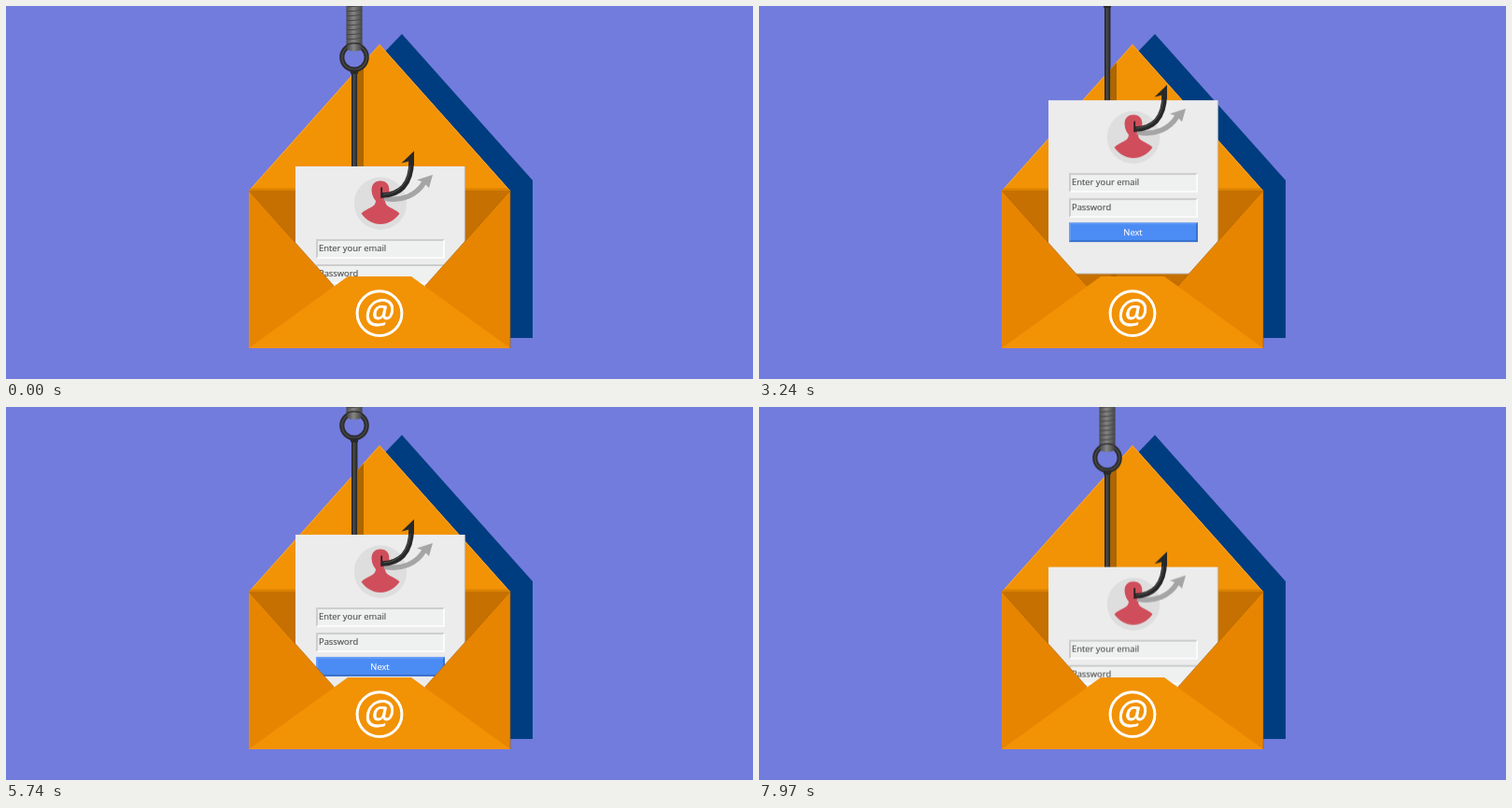
Recreate the animation shown at these times as an HTML page. Size 800x400 px, loop 8000 ms.

```html
<!DOCTYPE html>
<html lang="en">
<head>
<meta charset="utf-8">
<title>Phishing mail</title>
<style>
  html, body { margin: 0; width: 100%; height: 100%; overflow: hidden; background: #727cdd; }
  svg { display: block; width: 100vw; height: 100vh; }
  text { font-family: "Open Sans", "Noto Sans", sans-serif; }
  .label { font-size: 9.4px; fill: #505050; stroke: #505050; stroke-width: .15px; }
  .pull { animation: pull 8s cubic-bezier(.333, .167, .667, .833) infinite; }
  @keyframes pull {
    0%, 100% { transform: translateY(0); }
    10.417%  { transform: translateY(-24px); }
    25%      { transform: translateY(-12px); }
    40.417%  { transform: translateY(-71px); }
    61.25%   { transform: translateY(-25px); }
    80.833%  { transform: translateY(-43.5px); }
  }
</style>
</head>
<body>
<svg viewBox="0 0 800 400">
  <defs>
    <linearGradient id="round">
      <stop offset="0" stop-color="#1d1d1d"/>
      <stop offset=".4" stop-color="#4a4a4a"/>
      <stop offset="1" stop-color="#222"/>
    </linearGradient>
    <linearGradient id="cord">
      <stop offset="0" stop-color="#4c4c4c"/>
      <stop offset=".45" stop-color="#858585"/>
      <stop offset="1" stop-color="#454545"/>
    </linearGradient>
    <pattern id="twist" width="17" height="5" patternUnits="userSpaceOnUse" x="364.5" y="2">
      <path d="M0 3.5Q8 4 17 2" fill="none" stroke="#484848" stroke-width="1.1"/>
    </pattern>
    <g id="field">
      <rect x="332" y="250" width="138" height="21" fill="#eff0f0"/>
      <path d="M332 271V250H470L468 252H334V269Z" fill="#cdcdcd"/>
      <path d="M332 271H470V250L468 252V269H334Z" fill="#fbfbfb"/>
    </g>
    <g id="side">
      <path d="M260 198L351 300L370 320L260 367Z" fill="#e88500"/>
      <path d="M260 198L351 300" stroke="#a86200" stroke-width=".6"/>
    </g>
  </defs>

  <!-- envelope back -->
  <path d="M424 30L564 187V356H400V55Z" fill="#003d80"/>
  <path d="M400 41L540 198V367H260V198Z" fill="#f29205"/>
  <path d="M261 197.500L400 41.500L539 197.500" fill="none" stroke="#f7ab40" stroke-width=".9"/>
  <path d="M262 195.5H538L540 198H260Z" fill="#da8200"/>
  <path d="M260 198H540L449 301H351Z" fill="#c57000"/>
  <path d="M377 67L383 60.5V301H377Z" fill="#ad6600"/>

  <g class="pull">
    <!-- line and shank -->
    <rect x="364.5" y="-20" width="17" height="66" fill="url(#cord)"/>
    <rect x="364.5" y="-20" width="17" height="66" fill="url(#twist)"/>
    <rect x="370" y="68" width="6.4" height="106" fill="url(#round)"/>
    <circle cx="373" cy="55" r="13.2" fill="none" stroke="#2c2c2c" stroke-width="5.2"/>
    <circle cx="373" cy="55" r="13.2" fill="none" stroke="#4a4a4a" stroke-width="1.4"/>
    <path d="M365.5 42Q373 39 380.5 42V47Q373 50 365.5 47Z" fill="url(#cord)"/>
    <path d="M368 68.5H378L376.5 73H369.5Z" fill="#292929"/>

    <!-- login card -->
    <rect x="310" y="172" width="181.5" height="186" fill="#ececec"/>
    <path d="M491.3 172V358H310" fill="none" stroke="#b9b9b9" stroke-width=".8"/>
    <circle cx="401" cy="211.7" r="28.2" fill="#dedede"/>
    <path d="M401 187.5C407.500 187.500 410.700 192 410.400 198C410.200 203 408 206.500 406 209C406 216 415 216 421.500 222.500C416 230 409 234 401 234C393 234 386 230 380.500 222.500C387 216 396 216 396 209C394 206.500 391.800 203 391.600 198C391.300 192 394.500 187.500 401 187.500Z" fill="#d04e5b"/>
    <use href="#field"/>
    <use href="#field" y="27"/>
    <text class="label" x="335" y="263.5">Enter your email</text>
    <text class="label" x="335" y="290.5">Password</text>
    <rect x="332" y="303" width="138" height="21" fill="#4b8bf4"/>
    <path d="M332 324V303H470L468 305H334V322Z" fill="#659cf6"/>
    <path d="M332 324H470V303L468 305V322H334Z" fill="#3971cf"/>
    <text class="label" x="400.5" y="317" text-anchor="middle" style="fill:#fff;stroke:#fff">Next</text>

    <!-- barb and its shadow -->
    <path d="M405 206C424 210 440 203 448 189" fill="none" stroke="#a5a5a5" stroke-width="5.5"/>
    <path d="M457 181L440 186.500L446 188.500L450 192L453 195Z" fill="#a5a5a5"/>
    <path d="M402.200 194.500V206" stroke="#222" stroke-width="1.8"/>
    <path d="M402 203C421 203 434 192 434.200 166" fill="none" stroke="#282828" stroke-width="5.6"/>
    <path d="M404 202C420 201 432 191 432.800 168" fill="none" stroke="#555" stroke-width="1"/>
    <path d="M437 155.500L423.500 168.500L431.500 166.500V171H437Z" fill="#282828"/>
  </g>

  <!-- envelope front -->
  <use href="#side"/>
  <use href="#side" transform="matrix(-1 0 0 1 800 0)"/>
  <path d="M260 367L366 290H434L540 367Z" fill="#f29205"/>
  <path d="M540 198V367" stroke="#9c5a00" stroke-width=".6"/>
  <circle cx="400" cy="329.6" r="23.9" fill="none" stroke="#fff" stroke-width="3"/>
  <text transform="translate(400 339.6) skewX(-8)" x="-1" text-anchor="middle" font-size="36" fill="#fff" stroke="#fff" stroke-width=".7">@</text>
</svg>
</body>
</html>
```
